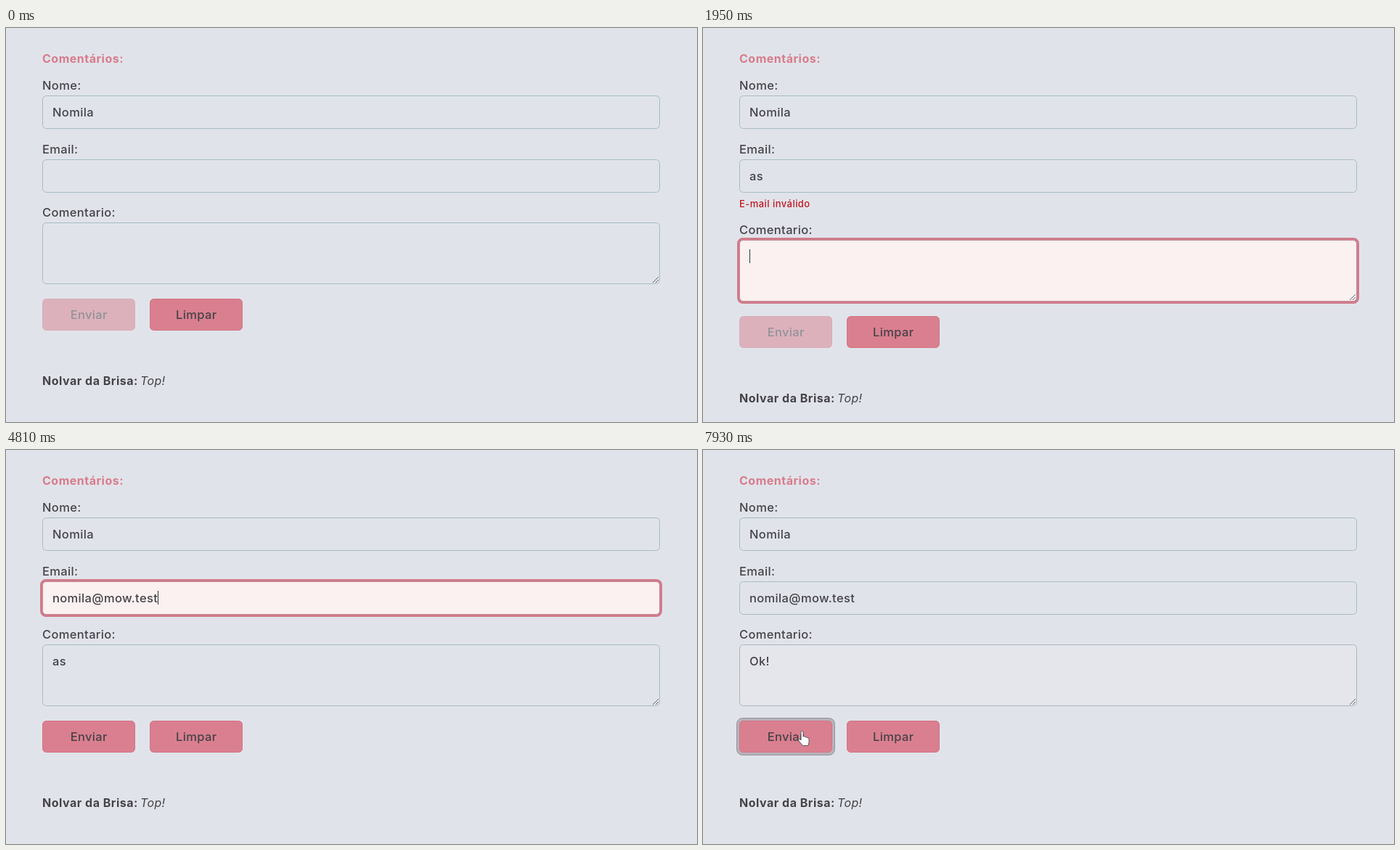
Recreate the animation shown at these times as an HTML page. Size 952 by 543 pixels, loop 8 s.

```html
<!DOCTYPE html>
<html lang="pt">
<head>
<meta charset="utf-8">
<style>
  html, body { margin: 0; width: 100%; height: 100%; overflow: hidden; background: #e0e4ea; }
  svg { display: block; }
  text { font: 450 16.5px Inter, sans-serif; letter-spacing: .35px; fill: #454248; white-space: pre; }
  .bold, .title { font-size: 16px; font-weight: 700; letter-spacing: .5px; }
  .title { fill: #d97b8c; }
  .quote { font-size: 16px; font-weight: 400; font-style: italic; }
  .error { font-size: 13px; letter-spacing: .45px; fill: #c4141f; }
  .button { text-anchor: middle; }
  .selected { fill: #fff; }
</style>
</head>
<body>
<svg id="stage" width="952" height="543" viewBox="0 0 952 543"></svg>
<script>
const LOOP = 8000, STEP = 130, LEFT = 50, PAD = 64;
const stage = document.getElementById('stage');
const pen = document.createElement('canvas').getContext('2d');

// Each timeline is a list of [start time, value].
const emailText = [[0, ''], [1430, 'a'], [1560, 'as'], [4680, 'nomila@mow.test']];
const commentText = [[0, ''], [2210, 'a'], [2470, 'as'], [5590, ''], [6630, 'O'], [6760, 'Ok'], [7020, 'Ok!']];
const pointer = [
  [0, null], [3900, ['arrow', 214, 263]], [4030, ['arrow', 195, 281]], [4810, null],
  [5590, ['arrow', 257, 235]], [7540, null], [7670, ['hand', 131, 386]]
];
const activity = [0, 910, 1430, 1560, 1820, 2210, 2470, 2730, 3770, 4680, 4940, 5590, 6630, 6760, 7020];
const emailFocus = [[910, 1820], [2860, 4940]];
const commentFocus = [[1820, 2860], [4940, 7840]];

const between = (t, a, b) => t >= a && t < b;
const at = (t, list) => list.filter(([start]) => start <= t).pop()[1];

// Focus appears at once and fades out after the field is left.
const focusLevel = (t, spans) => Math.max(0, ...spans.map(([a, b]) =>
  t < a ? 0 : t < b ? 1 : Math.max(0, .7 - (t - b) / 180)));

const caretOn = t =>
  Math.floor((t - activity.filter(a => a <= t).pop()) / 520) % 2 === 0;

function textWidth(s) {
  pen.font = '450 16.5px Inter, sans-serif';
  pen.letterSpacing = '.35px';
  return pen.measureText(s).width;
}

const text = (x, y, s, type = '') => `<text x="${x}" y="${y}" class="${type}">${s}</text>`;

const rect = (x, y, w, h, r, attrs) =>
  `<rect x="${x}" y="${y}" width="${w}" height="${h}" rx="${r}" ${attrs}/>`;

// The ring shrinks and fades together with the focus level.
function ring(y, h, level) {
  const width = 3.5 * level, out = width / 2 - .5;
  const opacity = Math.max(0, level - .2) / .8;
  return rect(LEFT - out, y - out, 851 + 2 * out, h + 2 * out, 5 + out,
    `fill="none" stroke="#d17b8b" stroke-width="${width}" opacity="${opacity}"`);
}

function field(y, h, value, { level = 0, active = false, selected = false, caret = false } = {}) {
  const box = attrs => rect(LEFT + .5, y + .5, 850, h - 1, 5, attrs);
  const end = PAD + textWidth(value);
  let out = box('fill="none" stroke="#a8bac5"');
  if (level) {
    out += box(`fill="#faf1f0" stroke="#b8a0a9" opacity="${level}"`) + ring(y, h, level);
  }
  if (selected) out += rect(PAD, y + 12, end - PAD, 20, 0, 'fill="#4f8ad5"');
  out += text(PAD, y + 28.5, value, selected ? 'selected' : '');
  if (active && caret && !selected) out += rect(Math.round(end), y + 13, 1, 19, 0, 'fill="#333"');
  return out;
}

function button(x, y, label, enabled, focused) {
  let out = '';
  if (focused) {
    out += rect(x - 3.5, y - 3.5, 135, 51, 8, 'fill="#b7b2bb" stroke="#98949e"');
  }
  return out + `<g opacity="${enabled ? 1 : .5}">` +
    rect(x + .5, y + .5, 127, 43, 5, 'fill="#da7f8f" stroke="#d37586"') +
    text(x + 64.25, y + 28, label, 'button') + '</g>';
}

function cursor([kind, x, y]) {
  const shape = kind === 'arrow'
    ? 'M.5 .5V16l3.6-3.3 2.5 5.4 2.4-1.1-2.5-5.2h4.8z'
    : 'M4 14V3q0-2 1.5-2T7 3v6q2.2-1.2 2.8.7 2-.9 2.6.9 2.6-.6 2.6 1.9v4q0 2.5-1.5 5H6.5L1 15q-1-2 .7-2.4 1-.2 2.3 1.4z';
  return `<path transform="translate(${x} ${y})" d="${shape}" fill="#fff" stroke="#4a4950" stroke-width=".9" stroke-linejoin="round"/>`;
}

function draw(t) {
  const email = at(t, emailText), comment = at(t, commentText), mouse = at(t, pointer);
  const emailError = between(t, 1820, 4680), commentError = between(t, 5590, 6630);
  const top = emailError ? 292 : 268;
  const low = emailError || commentError ? 24 : 0;
  const active = spans => spans.some(([a, b]) => between(t, a, b));
  const caret = caretOn(t);

  stage.innerHTML =
    text(LEFT, 47.5, 'Comentários:', 'title') +
    text(LEFT, 84.5, 'Nome:') + field(93, 46, 'Nomila') +
    text(LEFT, 172.5, 'Email:') +
    field(181, 46, email, {
      level: focusLevel(t, emailFocus), active: active(emailFocus),
      selected: between(t, 3770, 4680), caret
    }) +
    (emailError ? text(LEFT, 246.5, 'E-mail inválido', 'error') : '') +
    text(LEFT, top - 8.5, 'Comentario:') +
    field(top, 85, comment, {
      level: focusLevel(t, commentFocus), active: active(commentFocus),
      selected: between(t, 5200, 5590), caret
    }) +
    `<path d="M891 ${top + 83}l8-8m-4 8l4-4" stroke="#666" fill="none"/>` +
    (commentError ? text(LEFT, 373, 'Campo obrigatório', 'error') : '') +
    button(50, 373 + low, 'Enviar', between(t, 4680, 5590) || t >= 6630, t >= 7840) +
    button(198, 373 + low, 'Limpar', true) +
    text(LEFT, 492 + low, 'Nolvar da Brisa:', 'bold') +
    text(185, 492 + low, 'Top!', 'quote') +
    (mouse ? cursor(mouse) : '');
}

let shown = -1;
function tick() {
  const t = Math.floor(performance.now() % LOOP / STEP) * STEP;
  if (t !== shown) draw(shown = t);
  requestAnimationFrame(tick);
}
tick();
</script>
</body>
</html>
```
